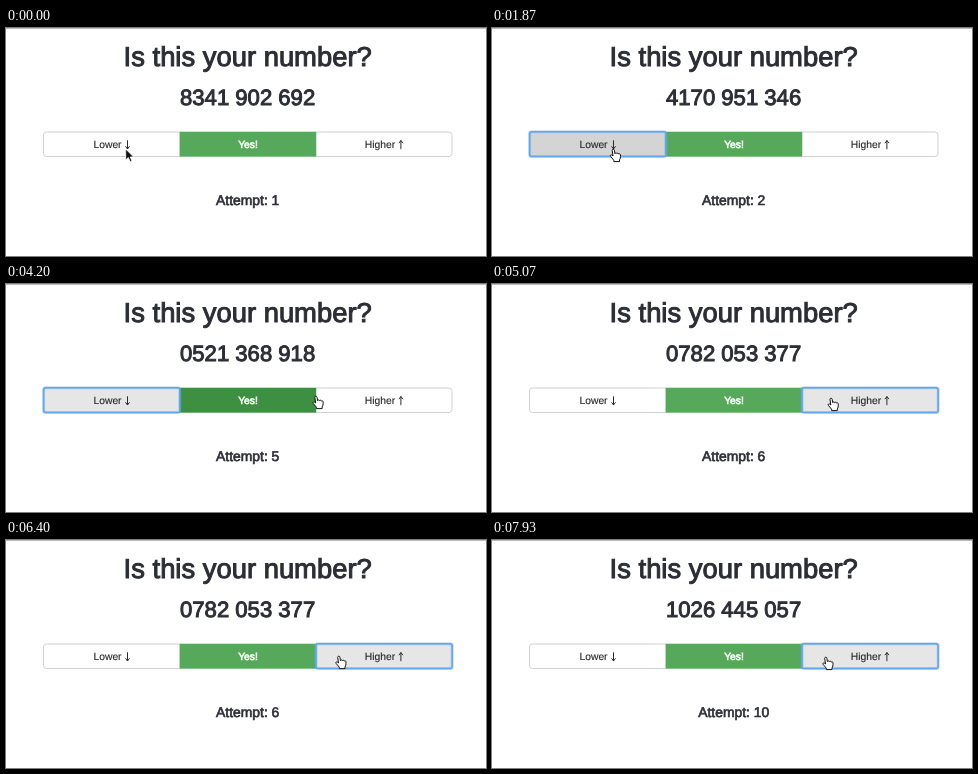
Write an HTML page that moves like this. It is 480x228 px and loops after 8 s.

```html
<!DOCTYPE html>
<html lang="en">
<head>
<meta charset="utf-8">
<title>Is this your number?</title>
<style>
  html, body { margin: 0; width: 100%; height: 100%; overflow: hidden; background: #fff; }
  svg { display: block; width: 100%; height: 100%; }
  text { font-family: "Liberation Sans", Arial, sans-serif; fill: #2c2e35; text-rendering: geometricPrecision; }
  .medium { text-anchor: middle; stroke: #2c2e35; stroke-width: 1px; }
  .label { font-size: 10.3px; fill: #292b2c; stroke: #292b2c; stroke-width: .15px; }
  .yes { text-anchor: middle; fill: #fff; stroke: #fff; stroke-width: .6px; }
  .arrow { fill: none; stroke: #292b2c; stroke-width: 1; }
  .button { stroke: #ccc; stroke-width: .9; }
  .ring rect { fill: none; stroke: #62a7ee; stroke-width: 1.5; }
  .ring .glow { stroke-width: 3; opacity: .4; }
</style>
</head>
<body>
<svg viewBox="0 0 480 228">
  <path d="M0 .5H480" stroke="#b9b9b9"/>
  <text class="medium" x="241.7" y="38.2" font-size="27.4">Is this your number?</text>
  <text class="medium" id="guess" x="241.6" y="76.9" font-size="22.1"></text>

  <path class="button" id="lower" d="M174 104H40.5a3 3 0 0 0-3 3v18.5a3 3 0 0 0 3 3H174z"/>
  <path class="button" id="higher" d="M310 104H443a3 3 0 0 1 3 3v18.5a3 3 0 0 1-3 3H310z"/>
  <rect id="yes" x="173.7" y="103.7" width="136.4" height="25"/>
  <g class="ring" id="ring">
    <rect class="glow" x="37.6" y="103.8" width="136.2" height="24.8" rx="2"/>
    <rect x="37.6" y="103.8" width="136.2" height="24.8" rx="2"/>
  </g>

  <text class="label" x="87.5" y="120">Lower</text>
  <path class="arrow" d="M121.5 112.300v8.700M119.500 118.300l2 2.700l2-2.700"/>
  <text class="label yes" x="242" y="120">Yes!</text>
  <text class="label" x="358.800" y="120">Higher</text>
  <path class="arrow" d="M394.900 121.200v-8.700M392.900 115.200l2-2.700l2 2.700"/>

  <text class="medium" id="attempt" x="241.700" y="177.200" font-size="13.900" style="stroke-width:.65px"></text>

  <path id="pointer" transform="translate(119.700 121)" fill="#111" stroke="#fff" stroke-width=".8"
    d="M0 0V11L2.600 8.600L4.500 12.800L6.300 12L4.500 8H8z"/>
  <path id="hand" fill="#fff" stroke="#111" stroke-width="1" stroke-linejoin="round"
    d="M-3.300-5.200c0-1.500 2-1.500 2.200 0l.5 3.300c.3-1 1.900-.9 2 .1c.4-.8 1.800-.6 1.900.4c.6-.6 1.700-.2 1.700.8c0 3-.2 3.600-1 5v1.700H-1.700V4.700L-4.900.9c-.8-1.200.5-2.100 1.500-1.200l.9.800z"/>
</svg>
<script>
const LOOP = 8000, FADE = 200;
const $ = id => document.getElementById(id);

// [button down, button up, direction of the answer]
const clicks = [
  [930, 1060, "lower"], [1810, 1960, "lower"], [2730, 3000, "lower"], [3600, 3700, "lower"],
  [4640, 4740, "higher"], [6500, 6590, "higher"], [6830, 6920, "higher"],
  [7160, 7250, "higher"], [7490, 7580, "higher"]
];

// [time, x, y] of the hand's centre
const path = [
  [0, 123.5, 127.5], [3840, 123.5, 127.5], [3950, 172, 124], [4200, 312, 118.5], [4400, 341, 120.5],
  [5100, 341.3, 120.5], [5800, 335, 122.5], [6500, 335, 122.5], [7000, 336, 123.5], [LOOP, 336, 123.5]
];

// Each guess bisects the range left by the previous answers.
const guesses = [8341902692];
let low = 0, high = guesses[0];
for (const [, , side] of clicks) {
  const last = guesses.at(-1);
  if (side === "lower") high = last; else low = last;
  guesses.push(Math.floor((low + high) / 2));
}

const clamp = v => Math.min(1, Math.max(0, v));
const mix = (a, b, p) => a + (b - a) * p;
const ease = p => p * p * (3 - 2 * p);
const fade = (t, start) => ease(clamp((t - start) / FADE));
const grouped = n => String(n).padStart(10, "0").replace(/(\d{4})(\d{3})(\d{3})/, "$1 $2 $3");
const rgb = c => `rgb(${c.map(Math.round).join()})`;

function pressed(t, side) {
  return Math.max(0, ...clicks.filter(c => c[2] === side).map(([down, up]) =>
    t < up ? clamp((t - down) / 60) : 1 - fade(t, up)));
}

function paintButton(t, side, enter, leave) {
  const active = fade(t, enter) - fade(t, leave);
  const shade = 255 - 25 * active - 18 * pressed(t, side);
  $(side).setAttribute("fill", rgb([shade, shade, shade]));
}

function handAt(t) {
  const i = path.findIndex(k => k[0] > t);
  const a = path[i - 1], b = path[i];
  const p = (t - a[0]) / (b[0] - a[0]);
  return [mix(a[1], b[1], p), mix(a[2], b[2], p)];
}

function draw(t) {
  const answered = clicks.filter(c => c[1] <= t).length;
  $("guess").textContent = grouped(guesses[answered]);
  $("attempt").textContent = `Attempt: ${answered + 1}`;

  paintButton(t, "lower", 70, 4640);
  paintButton(t, "higher", 4215, LOOP);
  const over = fade(t, 3955) - fade(t, 4215);
  $("yes").setAttribute("fill", rgb([mix(86, 61, over), mix(169, 143, over), mix(91, 65, over)]));

  const focus = clicks.filter(c => c[0] <= t).at(-1);
  $("ring").style.display = focus ? "" : "none";
  $("ring").setAttribute("transform", `translate(${focus && focus[2] === "higher" ? 272.4 : 0} 0)`);

  const hovering = t >= 70;
  $("pointer").style.display = hovering ? "none" : "";
  $("hand").style.display = hovering ? "" : "none";
  $("hand").setAttribute("transform", `translate(${handAt(t).join(" ")})`);
}

const start = performance.now();
function tick() {
  draw((performance.now() - start) % LOOP);
  requestAnimationFrame(tick);
}
tick();
</script>
</body>
</html>
```
